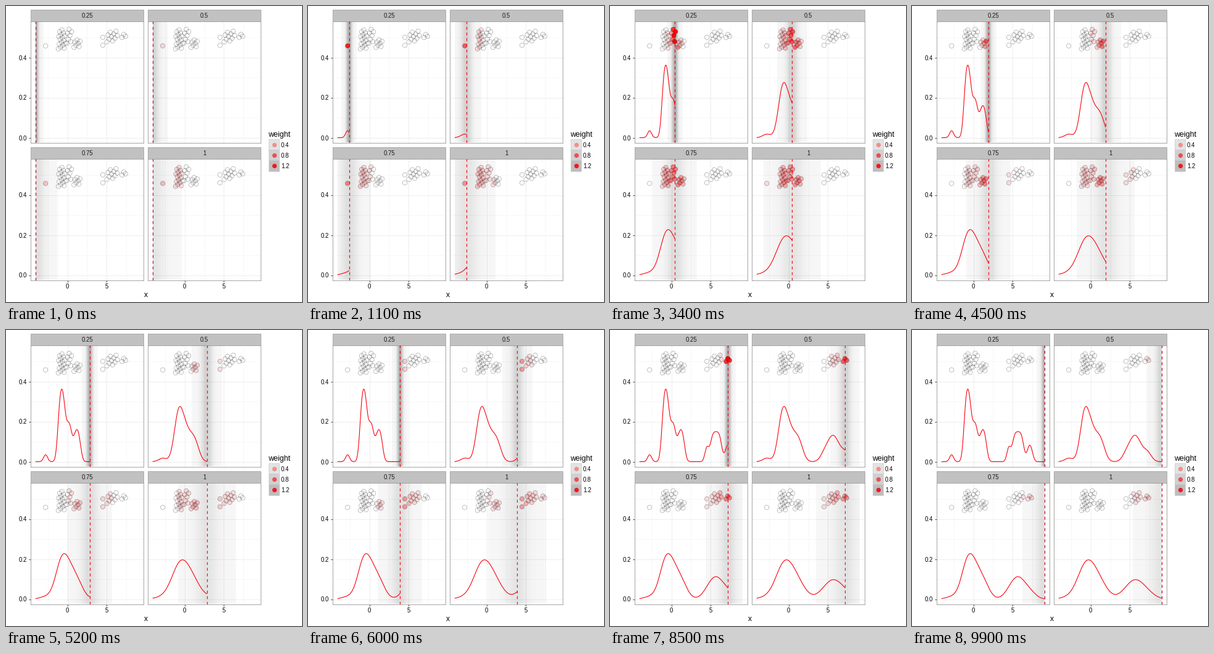
These frames come from a looping animation (480x480 px, 10000 ms). A matplotlib script:

```python
import numpy as np
import matplotlib.pyplot as plt
from matplotlib.animation import FuncAnimation
from matplotlib.patches import Rectangle

SIZE, DPI, FRAMES = 480, 100, 100
PX = 72 / DPI  # points per pixel
LO, HI = -4, 9
XLIM, YLIM = (-4.65, 9.65), (-8 / 325, 189 / 325)
PANEL_W, PANEL_H, STRIP_H = 183, 197, 19
MIN_WEIGHT = 0.0005
GOLDEN = (5 ** 0.5 - 1) / 2
RED = "#fa000c"

plt.rcParams.update({"font.family": "Liberation Sans", "font.size": 9.6 * PX})


def cluster(n, x, dx, y, dy):
    """Evenly spaced samples, with heights scattered by the golden ratio."""
    k = np.arange(n)
    across = (2 * k + 1 - n) / max(n - 1, 1)
    return x + dx * across, y + dy * (2 * (k * GOLDEN % 1) - 1)


xs, ys = np.hstack([
    cluster(1, -2.76, 0, 0.458, 0),
    cluster(16, -0.72, 0.42, 0.493, 0.05),
    cluster(7, 0.22, 0.30, 0.512, 0.04),
    cluster(7, 1.22, 0.38, 0.472, 0.021),
    cluster(2, 4.50, 0, 0.493, 0.032),
    cluster(10, 5.66, 0.65, 0.506, 0.028),
    cluster(3, 7.15, 0.22, 0.512, 0.012),
])
grid = np.linspace(LO, HI, 521)


def kernel(d, h):
    return np.exp(-0.5 * (d / h) ** 2) / (h * np.sqrt(2 * np.pi))


def point_alpha(w):
    return np.where(w >= MIN_WEIGHT, np.clip(0.1 + 0.65 * w, 0, 1), 0)


def band_alpha(w):
    return np.where(w >= MIN_WEIGHT, 0.035 + 0.185 * w, 0)


fig = plt.figure(figsize=(SIZE / DPI, SIZE / DPI), dpi=DPI, facecolor="white")

page = fig.add_axes([0, 0, 1, 1])
page.set(xlim=(0, SIZE), ylim=(SIZE, 0))
page.axis("off")


def label(x, y, text, size=9.6, ha="center", color="black"):
    page.text(x, y, text, ha=ha, va="center_baseline", size=size * PX, color=color)


def box(x, y, w, h, fill, edge):
    page.add_patch(Rectangle((x, y), w, h, fc=fill, ec=edge, lw=0.8 * PX))


class Panel:
    def __init__(self, left, top, h, show_x, show_y):
        self.h = h
        box(left, top - STRIP_H, PANEL_W, STRIP_H, "#c1c1c1", "#a0a0a0")
        label(left + PANEL_W / 2, top - STRIP_H / 2, f"{h:g}", color="#1a1a1a")

        ax = fig.add_axes([left / SIZE, 1 - (top + PANEL_H) / SIZE,
                           PANEL_W / SIZE, PANEL_H / SIZE])
        ax.set_xticks([0, 5])
        ax.set_yticks([0, 0.2, 0.4])
        ax.set_xticks([-2.5, 2.5, 7.5], minor=True)
        ax.set_yticks([0.1, 0.3, 0.5], minor=True)
        ax.grid(color="#e8e8e8", lw=0.7 * PX)
        ax.grid(which="minor", color="#f6f6f6", lw=0.8 * PX)
        ax.set_axisbelow(True)
        ax.tick_params(length=3 * PX, width=0.9 * PX, pad=3 * PX, color="#333333",
                       bottom=show_x, labelbottom=show_x,
                       left=show_y, labelleft=show_y)
        ax.tick_params(which="minor", length=0)
        for side in ax.spines.values():
            side.set(color="#909090", linewidth=0.8 * PX)

        self.rgba = np.zeros((1, grid.size, 4))
        self.band = ax.imshow(self.rgba, extent=(LO, HI, -1, 1), aspect="auto",
                              interpolation="nearest", zorder=1.5)
        self.fill = np.tile([1.0, 0, 0.02, 0], (xs.size, 1))
        self.dots = ax.scatter(xs, ys, s=(7.3 * PX) ** 2, lw=0.8 * PX,
                               edgecolors=(0, 0, 0, 0.3), zorder=3)
        self.curve, = ax.plot([], [], color=RED, lw=1.1 * PX, zorder=4)
        self.cursor = ax.axvline(LO, color=RED, lw=1.15 * PX,
                                 ls=(0, (4, 4)), zorder=5)
        self.density = kernel(grid[:, None] - xs, h).mean(axis=1)
        ax.set(xlim=XLIM, ylim=YLIM)

    def update(self, x):
        self.rgba[0, :, 3] = band_alpha(kernel(grid - x, self.h))
        self.band.set_data(self.rgba)
        self.fill[:, 3] = point_alpha(kernel(xs - x, self.h))
        self.dots.set_facecolors(self.fill)
        seen = grid <= x + 1e-9
        self.curve.set_data(grid[seen], self.density[seen])
        self.cursor.set_xdata([x, x])
        at_end = min(x - LO, HI - x) < 1e-6
        self.cursor.set_color("#b8001c" if at_end else RED)
        return self.band, self.dots, self.curve, self.cursor


panels = [Panel(40 + 190 * col, 24.5 + 223 * row, 0.25 * (1 + col + 2 * row),
                show_x=row == 1, show_y=col == 0)
          for row in range(2) for col in range(2)]

label(227, 467.5, "x", 12)
label(425.5, 207.3, "weight", 12.4, "left")
for k, w in enumerate([0.4, 0.8, 1.2]):
    y = 224.7 + 17.2 * k
    shade = 1 - band_alpha(w)
    box(426.3, y - 8.6, 17, 17.2, (shade,) * 3, "#cccccc")
    page.scatter(434.8, y, s=(7.3 * PX) ** 2, color=RED, lw=0,
                 alpha=float(point_alpha(w)), zorder=3)
    label(446, y, f"{w}", ha="left")


def draw(i):
    x = LO + (HI - LO) * i / (FRAMES - 1)
    return [a for p in panels for a in p.update(x)]


anim = FuncAnimation(fig, draw, frames=FRAMES, interval=100,
                     repeat=True, repeat_delay=0, blit=False)
plt.show()
```
